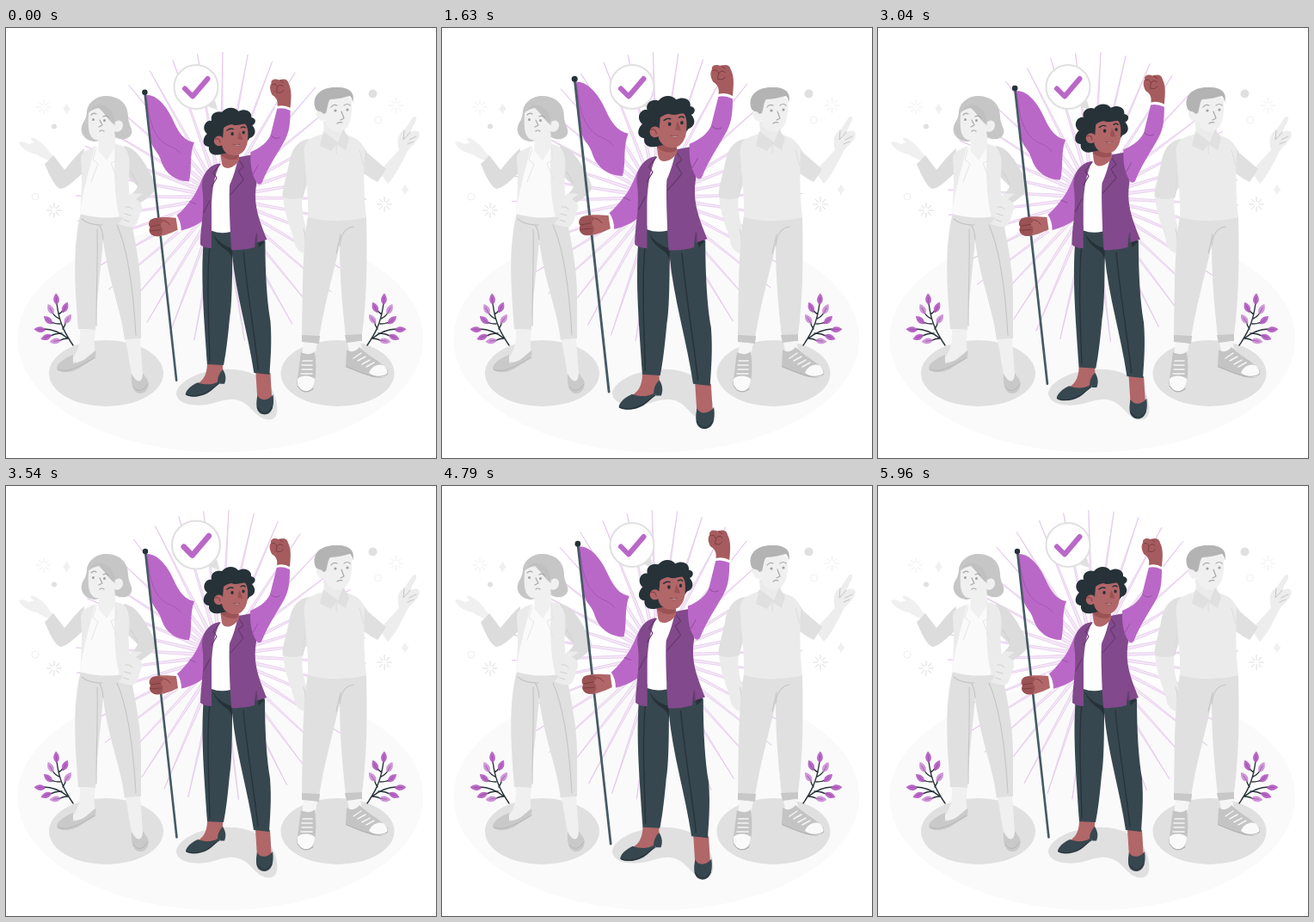
Write an HTML page that moves like this. It is 500 px wide and 500 px high and loops after 6 s.

```html
<!DOCTYPE html>
<html lang="en">
<head>
<meta charset="utf-8">
<title>Leader with flag</title>
<style>
html, body { margin: 0; width: 100%; height: 100%; overflow: hidden; background: #fff; }
svg { display: block; width: 100vw; height: 100vh; }
.line { fill: none; stroke-linecap: round; stroke-linejoin: round; }
.grey { stroke: #c4c4c4; }
.dim { stroke: #a8a8a8; }
.dark { stroke: #263238; }
.skin { fill: #b16668; }
.deep { fill: #9a5254; }
.ink { fill: #263238; }
.slate { fill: #37474f; }
.lilac { fill: #ba68c8; }
.plum { fill: #82498c; }
</style>
</head>
<body>
<svg viewBox="0 0 500 500">
  <defs>
    <path id="spark" class="line" d="M0-3V-8.5M0 3V8.5M-3 0H-8.5M3 0H8.5M-2.2-2.2L-5.6-5.6M2.2 2.2L5.6 5.6M-2.2 2.2L-5.6 5.6M2.2-2.2L5.6-5.6"/>
    <path id="gem" d="M0-7Q1.5-2 4.5 0Q1.5 2 0 7Q-1.5 2-4.5 0Q-1.5-2 0-7Z" fill="#f0f0f0"/>
    <g id="plant">
      <path class="line dark" stroke-width="1.4" d="M78 369C70 357 62 345 59 320M72 361C62 353 51 350 44 350M66 350Q70 344 69 341M62 338Q57 336 54 331M61 333Q65 331 66 328M63 344Q56 344 53 342M65 355Q57 355 52 358M72 361Q66 361 62 364"/>
      <g id="leaves"></g>
    </g>
  </defs>

  <ellipse cx="249.300" cy="361.500" rx="236" ry="132" fill="#fafafa"/>
  <g id="rays" fill="#f4e8f7" stroke="#e2c1e9" stroke-width=".65"></g>

  <g fill="#e0e0e0">
    <ellipse cx="116.500" cy="401.500" rx="66.500" ry="38.500"/>
    <ellipse cx="385.500" cy="401.500" rx="66" ry="38.500"/>
    <path d="M198 425C199 412 222 399 251 397C283 395 307 408 313 429C317 442 317 455 306 455.500C292 455 288 443 277 436C264 428 252 433 238 437C220 441 199 438 198 425Z"/>
  </g>

  <!-- scattered ornaments -->
  <g stroke="#efefef"><use href="#spark" x="44" y="92"/><use href="#spark" x="453.500" y="90"/></g>
  <g stroke="#dcdcdc"><use href="#spark" x="56" y="212"/><use href="#spark" x="440" y="205"/></g>
  <use href="#gem" x="70.500" y="94"/><use href="#gem" x="464" y="188"/>
  <circle cx="56" cy="114.500" r="3" fill="#e0e0e0"/><circle cx="426.500" cy="76.500" r="5" fill="#e0e0e0"/>
  <g fill="none" stroke="#efefef"><circle cx="34" cy="196" r="4"/><circle cx="432.500" cy="107" r="4"/></g>

  <use href="#plant"/>
  <use href="#plant" transform="matrix(-1 0 0 1 498 0)"/>

  <!-- woman on the left -->
  <g>
    <path fill="#c6c6c6" d="M94 96C96 85 107 78 118 79C133 80 142 89 142 103C142 112 148 117 146 123C143 130 134 131 127 127L104 132C93 132 86 123 88 115C89 109 94 107 94 96Z"/>
    <path fill="#f0f0f0" d="M108 126L107 146L117 155L128 139L126 118Z"/>
    <path fill="#f0f0f0" d="M96 101C96 94 102 91 108 91C116 94 123 101 127 110C130 105 137 108 136 114C135 120 130 122 126 120C122 128 113 132 104 130C96 127 95 116 96 101Z"/>
    <path fill="#c0c0c0" d="M95 99C101 88 113 87 120 94C126 99 126 107 127 113C119 108 116 100 108 93Q101 94 95 99Z"/>
    <path class="line dim" stroke-width="1.200" d="M99 101Q102 98 105 100M113 103Q117 101 119 104M109 107L112 113L108 115M109 120Q111 118 114 120"/>
    <circle cx="101.500" cy="106.500" r="1.500" fill="#a0a0a0"/><circle cx="114.500" cy="107.500" r="1.500" fill="#a0a0a0"/>
    <path fill="#f0f0f0" d="M55 156C47 153 41 151 36 147C29 146 18 141 15 133C19 130 23 134 27 135L33 133C27 130 28 127 33 128L42 134C48 140 50 144 55 149Z"/>
    <path fill="#dcdcdc" d="M91 140C83 146 75 157 68 165L55 148Q50 154 45 158C50 170 56 184 63 187C70 187 81 176 89 169Z"/>
    <path fill="#dcdcdc" d="M137 137C146 138 154 146 161 157C169 171 177 184 173 189C166 198 157 202 150 208L140 199C147 193 152 188 153 184L138 169Z"/>
    <path fill="#e0e0e0" d="M87 215L144 215C149 243 157 278 157 309L157 361L138 363C134 327 119 295 113 247C110 281 105 320 104 351L84 350C81 309 76 259 87 215Z"/>
    <path class="line grey" stroke-width="1.100" d="M88 222Q96 229 112 229M113 246Q112 233 108 229M106 234C107 270 105 298 105 346M129 229C142 258 148 304 151 357"/>
    <path fill="#fafafa" d="M101 139L107 142L117 154L128 137L136 140L138 218C120 223 100 220 86 216C88 190 88 159 101 139Z"/>
    <path fill="#ebebeb" d="M105 137C92 142 86 145 87 154C89 173 88 196 86 216C88 195 96 168 103 140ZM127 135C142 136 145 149 143 169C141 188 146 204 146 220L132 220C126 198 125 166 127 135Z"/>
    <path class="line" stroke="#e6e6e6" d="M105 139L101 153L107 158L99 179M127 138L129 154L122 157L130 177"/>
    <path fill="#ececec" d="M151 199C158 202 160 208 157 213C154 221 154 226 149 231C143 232 135 230 130 227C137 224 137 217 136 212C136 205 142 201 146 192L159 193Z"/>
    <path class="line" stroke="#cfcfcf" d="M139 208Q145 207 147 211M138 216L145 218M137 223L143 225M153 181L145 167"/>
    <path fill="#f0f0f0" d="M86 350L104 351C102 365 103 373 104 378C94 386 85 391 74 387C84 379 87 365 86 350ZM139 362L156 361L159 402C158 419 151 420 147 409Z"/>
    <path fill="#c9c9c9" d="M78 380C70 383 60 389 59 395C60 402 76 402 86 395C97 387 107 385 104 375C96 381 90 389 78 390ZM146 402C145 415 148 425 156 425C164 425 167 416 165 410L159 401C159 412 153 415 146 402Z"/>
    <path class="line" stroke="#b6b6b6" d="M60 397C70 401 82 396 104 383M148 417Q156 428 165 414"/>
  </g>

  <!-- man on the right -->
  <g>
    <path fill="#ebebeb" d="M369 108L371 137L386 145L396 132L393 112Z"/>
    <path fill="#f0f0f0" d="M402 84C398 77 386 77 376 81L369 96C363 93 359 98 362 103C364 108 368 109 371 107C373 117 380 122 390 120C401 116 403 101 402 84Z"/>
    <path fill="#b3b3b3" d="M403 87C407 75 398 68 384 69C369 68 356 77 359 91C360 99 366 95 369 100L372 99C374 93 374 86 377 83C385 83 395 80 400 79Q403 82 403 87Z"/>
    <path class="line dim" stroke-width="1.200" d="M378 92Q381 88 385 90M393 90Q397 87 400 90M390 97L393 105L389 107M385 111Q388 109 391 110"/>
    <circle cx="383" cy="96" r="1.600" fill="#a0a0a0"/><circle cx="397" cy="95" r="1.600" fill="#a0a0a0"/>
    <path fill="#ededed" d="M444 181L434 167C444 156 451 148 457 142C454 132 456 121 463 119L473 104C477 101 479 105 475 111L470 121C478 117 483 121 480 127C478 133 472 136 467 143C462 153 453 172 444 181Z"/>
    <path class="line grey" d="M463 119L462 130Q467 125 470 121M469 130L477 126M467 135L474 132"/>
    <path fill="#e0e0e0" d="M399 126C410 128 413 134 420 145L442 164Q436 174 432 179C422 174 413 167 405 160Z"/>
    <path fill="#ebebeb" d="M322 193C323 220 334 237 336 252C340 261 348 265 352 258C357 251 355 240 349 233C345 218 343 207 345 193Z"/>
    <path fill="#e0e0e0" d="M354 129C339 130 332 141 329 158C326 174 320 190 322 197Q334 201 345 197L356 164Z"/>
    <path class="line" stroke="#d0d0d0" d="M346 234Q349 241 348 247M351 249L349 256"/>
    <path fill="#e0e0e0" d="M351 218L419 219C420 266 420 313 414 357L395 359C392 331 388 294 388 253C379 292 369 327 364 361L344 361C345 310 344 262 351 218Z"/>
    <path class="line grey" stroke-width="1.100" d="M404 231Q390 233 388 253M389 240L384 262"/>
    <path fill="#c8c8c8" d="M344 357L365 358L364 367L344 365ZM394 357L414 356L414 364L396 366Z"/>
    <path fill="#ebebeb" d="M369 123C352 128 345 131 347 150C349 177 352 198 351 220C372 226 400 225 419 220C416 197 416 166 417 142C414 131 404 126 392 123L385 137Z"/>
    <path fill="#e0e0e0" d="M369 120L365 137L378 143L384 135L395 142L399 128L392 118L386 133Z"/>
    <path class="line" stroke="#dcdcdc" d="M384 136V146M348 172L345 197M416 160L411 142"/>
    <path fill="#f5f5f5" d="M346 366L362 367L359 381H344ZM397 366L412 364L415 378L400 380Z"/>
    <path fill="#c4c4c4" d="M343 377C350 380 355 380 359 376C361 392 361 406 357 420C348 427 339 422 338 412C341 398 341 389 343 377ZM396 374C402 378 407 376 411 371C423 383 437 388 444 398C446 409 431 408 421 404L395 394Z"/>
    <path fill="#fafafa" d="M339 408C345 403 354 404 359 408C359 418 354 423 347 422C341 421 338 416 339 408ZM422 401C425 393 434 389 440 393C446 401 444 405 437 406Q429 406 422 401Z"/>
    <path class="line" stroke="#f5f5f5" stroke-width="1.500" d="M345 387H356M344 392H356M344 397H356M343 402H356M404 384L413 378M409 387L418 382M414 391L423 386M419 394L428 389"/>
    <path class="line" stroke="#adadad" d="M339 416Q346 428 357 420M396 394C411 400 433 411 444 402"/>
  </g>

  <g id="bubble">
    <path d="M233 90Q240 94 246 95L243 84Z" fill="#e0e0e0"/>
    <circle cx="221" cy="68.500" r="25.500" fill="#fff" stroke="#e0e0e0" stroke-width="2"/>
    <path class="line" stroke="#ba68c8" stroke-width="6" d="M208 70.500L217 79.500L234.500 59"/>
  </g>

  <!-- flag bearer -->
  <g id="leader">
    <path class="lilac" d="M163 79C176 78 188 93 195 109C201 123 208 132 219 134C213 149 217 165 213 179C199 179 186 171 181 156C178 145 172 143 169 133Z"/>
    <path class="line" stroke="#9c55a9" stroke-width=".8" d="M164 82C167 103 169 121 182 133C191 140 198 139 203 147"/>
    <path class="skin" d="M234 389L252 388L252 402C247 414 234 419 220 414C228 410 234 404 234 389ZM290 399L307 400L309 434C305 444 295 440 292 431Z"/>
    <path class="slate" d="M223 411C231 414 240 414 246 410C246 405 248 400 252 396C256 402 256 408 254 412.500H248.500V411C244 415 240 420 235 423C227 428 213 429 209 425C209 420 216 414 223 411ZM292 426C290 437 290 447 300 448C309 448 312 438 310 425C306 431 296 434 292 426Z"/>
    <path class="line dark" d="M210 425C219 429 229 425 236 421L248 412M292 440Q300 453 309 440"/>
    <path class="slate" d="M237 231L292 235L301 248C301 285 303 318 307 340C309 365 307 385 306 402L288 400C281 353 267 309 263 264C263 302 262 326 260 336C258 358 256 376 253 391L234 390C231 344 226 290 230 246Z"/>
    <path class="line dark" stroke-width="1.300" d="M237 252C233 297 236 342 237 386M276 261C281 313 288 350 293 396"/>
    <path class="ink" d="M241 240C247 249 255 254 263 256L263 274Q263 263 257 259Q245 252 241 240ZM290 240L300 249L294 255Z"/>
    <path fill="#fff" d="M248 157L272 153L265 177C261 199 260 220 261 237Q249 240 239 236C237 207 239 178 248 157Z"/>
    <path class="lilac" d="M246 159C237 160 230 170 226 181C222 190 219 196 214 202C207 211 202 216 197 220L202 236C217 233 229 226 234 219L240 181Z"/>
    <path class="plum" d="M249 158C236 160 228 171 228 185C232 211 226 231 226 252Q231 256 239 256L239 208C240 181 244 169 249 158ZM270 151L286 148C291 157 291 170 291 181C287 205 293 221 303 246L291 250L290 240L289 255Q276 259 262 258C260 225 259 195 260 183Q266 170 270 151Z"/>
    <path class="lilac" d="M284 145C296 140 303 134 307 126L315 94Q323 92 330 96C330 112 329 121 324 131C316 146 306 159 297 181Q293 184 291 180C284 168 284 157 284 145Z"/>
    <path class="line" stroke="#64386c" stroke-width="1.100" d="M249 159L241 169L245 175L239 185M270 153L276 162L270 167L276 177L261 194M230 215L237 201M291 239L292 250"/>
    <path class="line" stroke="#9652a3" d="M286 172L293 160M308 126Q312 131 318 128M214 202L221 205"/>
    <path class="skin" d="M249 145L251 159C253 167 266 164 271 154L270 143Z"/>
    <path class="deep" d="M251 144L271 149L269 153Q259 156 250 149Z"/>
    <path class="ink" d="M252 147C240 151 235 145 236 139C227 138 229 128 234 124C226 117 233 107 239 109C237 100 246 97 251 99C257 92 266 93 270 98C278 94 286 98 285 105C292 106 290 113 286 114C292 121 289 127 283 129L273 143Z"/>
    <path class="skin" d="M253 117C260 111 268 114 272 110C279 110 282 117 281 128C281 140 275 150 264 149C256 148 252 143 251 137C246 140 241 136 242 131C243 126 250 125 252 129Z"/>
    <path class="ink" d="M249 126C250 114 257 110 265 114C273 115 279 109 284 116L286 106L260 98L242 110Z"/>
    <path class="deep" d="M271 121Q275 128 275 131L269 130Z"/>
    <ellipse class="ink" cx="263" cy="124" rx="1.700" ry="2.100"/><ellipse class="ink" cx="276" cy="122.500" rx="1.600" ry="2"/>
    <path class="line dark" stroke-width="1.400" d="M257 120Q261 117 264 118.500M273 117Q276 115 278 117"/>
    <path class="line" stroke="#7c3f42" d="M243 130Q248 128 249 134"/>
    <path d="M264 136Q268 138 272 136Q269 140 264 136Z" fill="#fff" stroke="#7c3f42" stroke-width=".6"/>
    <path class="line" stroke="#fff" stroke-width="4" stroke-linecap="butt" d="M314 93Q322 91 330 95M197 219Q202 226 202 236"/>
    <path fill="#a65c5e" d="M315 92C316 86 314 82 309 79C306 73 306 69 308 66C307 61 313 60 317 62C323 60 327 61 328 66C332 74 331 83 330 94Q323 90 315 92Z"/>
    <path class="line" stroke="#783b3d" stroke-width=".9" d="M309 67Q313 65 315 70Q318 66 322 69M315 70L314 76Q320 78 322 74M318 62L322 65"/>
    <path class="line" stroke="#455a64" stroke-width="2.600" stroke-linecap="butt" d="M162 76L198.500 408.500"/>
    <circle class="ink" cx="162" cy="76" r="3.200"/>
    <path class="skin" d="M198 221C190 221 181 219 172 222C166 224 167 228 169 231C165 235 168 242 175 242C184 243 193 238 200 235Z"/>
    <path class="deep" d="M168 224C172 220 180 221 184 224L179 229C184 232 183 240 179 242C171 244 165 238 168 232C166 230 166 227 168 224Z"/>
    <path class="line" stroke="#783b3d" stroke-width=".9" d="M169 231L180 229M168 236L180 235M184 224Q188 225 191 229"/>
  </g>
</svg>
<script>
const byId = id => document.getElementById(id);
const rays = byId('rays'), bubble = byId('bubble'), leader = byId('leader');

const repeat = (count, draw) => Array.from({ length: count }, (_, i) => draw(i)).join('');
rays.innerHTML = repeat(36, i => `<path d="M0-169L1.9-24H-1.9Z" transform="rotate(${i * 10})"/>`);

// base x, base y, angle, light tint
const leaves = [
  [59, 322, -4, 0], [66, 331, 25, 0], [55, 333, -28, 1], [68, 344, 36, 1],
  [54, 344, -48, 0], [46, 351, -87, 0], [53, 357, -112, 0], [64, 363, -98, 1]
];
byId('leaves').innerHTML = leaves.map(([x, y, angle, light]) =>
  `<g transform="translate(${x} ${y}) rotate(${angle})"><path d="M0 0C-5-4-4-9 0-13.500C4-9 5-4 0 0Z" fill="${light ? '#cf95d9' : '#ba68c8'}"/><path d="M0 0V-9" stroke="#82498c" stroke-width=".6"/></g>`
).join('');

const LOOP = 6000, BEAT = 1500;
const beatKeys = [[0, 1], [.1, 1.1], [.3, 1], [.4, 1], [.5, 1.1], [.6, 1], [1, 1]];

function beat(ms) {
  const p = ((ms / BEAT) % 1 + 1) % 1;
  const i = beatKeys.findIndex(([at]) => at > p);
  const [a, from] = beatKeys[i - 1], [b, to] = beatKeys[i];
  return from + (to - from) * (p - a) / (b - a);
}

function scaleAbout(node, x, y, scale) {
  node.setAttribute('transform', `translate(${x} ${y}) scale(${scale}) translate(${-x} ${-y})`);
}

function render(now) {
  const t = now % LOOP;
  rays.setAttribute('transform', `translate(250 197) rotate(${.6 + t / LOOP * 360})`);
  scaleAbout(leader, 245, 254, beat(t + 10));
  scaleAbout(bubble, 221, 68.5, beat(t - 395));
}

const start = performance.now();
function frame() {
  render(performance.now() - start);
  requestAnimationFrame(frame);
}
frame();
</script>
</body>
</html>
```
